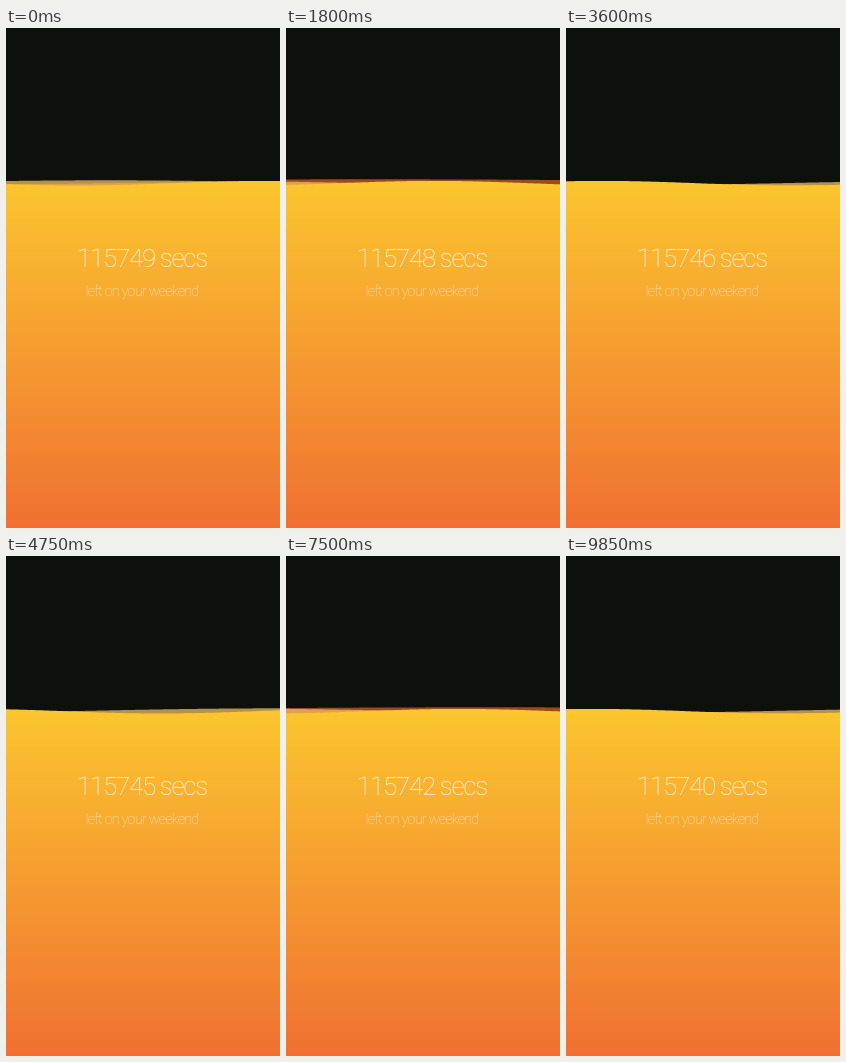
An HTML page with a canvas for the animation above (9.9 s loop, 274 by 500 pixels).

```html
<!DOCTYPE html>
<html lang="en">
<head>
<meta charset="utf-8">
<title>Weekend countdown</title>
<style>
  html, body { margin: 0; width: 100%; height: 100%; overflow: hidden; background: #0e100c; }
  canvas { display: block; }
</style>
</head>
<body>
<canvas id="stage" width="274" height="500"></canvas>
<script>
const W = 274, H = 500;
const LOOP = 9900, WAVE_PERIOD = 6100;
const START = 115749;
const TAU = Math.PI * 2;
const ctx = document.getElementById('stage').getContext('2d');

const sun = ctx.createLinearGradient(0, 153, 0, H);
sun.addColorStop(0, '#fbc62f');
sun.addColorStop(1, '#f07032');

// Back to front; every wave travels to the left.
const waves = [
  { fill: '#a04a1c', alpha: 1, level: 154.5, height: 3.2, length: 1745, crest: 600 },
  { fill: '#f8c968', alpha: 0.7, level: 154.9, height: 2.6, length: 800, crest: 100 },
  { fill: sun, alpha: 1, level: 155.2, height: 2.3, length: 380, crest: 260 }
];

function setFont(weight, size) {
  ctx.font = `${weight} condensed ${size}px Roboto, "Open Sans", sans-serif`;
  ctx.letterSpacing = `${-0.05 * size}px`;
}

// Largest font size that respects both a line width and a capital height.
function fontSize(sample, weight, width, capHeight) {
  setFont(weight, 100);
  return Math.min(100 * width / ctx.measureText(sample).width, capHeight / 0.711);
}

const NOTE = 'left on your weekend';
const title = { weight: 100, middle: 230, alpha: 1 };
const note = { weight: 200, middle: 262.5, alpha: 0.75 };
title.size = fontSize(START + ' secs', title.weight, 130, 28);
note.size = fontSize(NOTE, note.weight, 113, 15);

function drawWave({ fill, alpha, level, height, length, crest }, t) {
  ctx.globalAlpha = alpha;
  ctx.fillStyle = fill;
  ctx.beginPath();
  ctx.moveTo(0, H);
  for (let x = 0; x <= W; x += 2) {
    const phase = TAU * ((x - crest) / length + t / WAVE_PERIOD);
    ctx.lineTo(x, level - height * Math.cos(phase));
  }
  ctx.lineTo(W, H);
  ctx.fill();
}

function drawLine(text, { weight, size, middle, alpha }) {
  setFont(weight, size);
  ctx.globalAlpha = alpha;
  ctx.fillStyle = '#fff';
  ctx.fillText(text, 136, middle + 0.355 * size);
}

function draw(t) {
  ctx.globalAlpha = 1;
  ctx.fillStyle = '#0e100c';
  ctx.fillRect(0, 0, W, H);
  waves.forEach(wave => drawWave(wave, t));

  const elapsed = Math.max(0, Math.floor((t - 49) / 1000));
  ctx.textAlign = 'center';
  drawLine(`${START - elapsed} secs`, title);
  drawLine(NOTE, note);
}

const begin = performance.now();
function tick() {
  draw((performance.now() - begin) % LOOP);
  requestAnimationFrame(tick);
}
tick();
</script>
</body>
</html>
```
